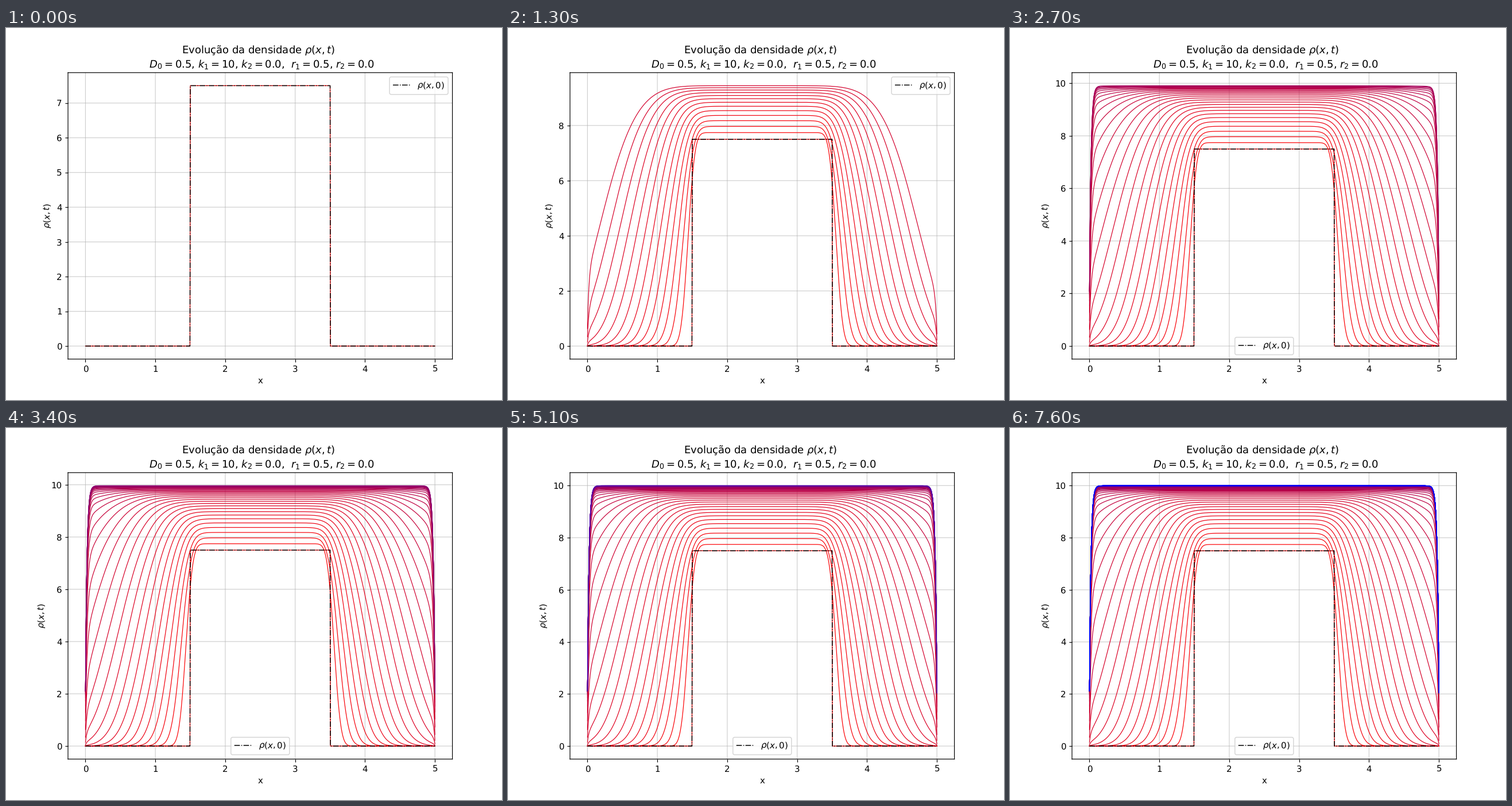
Recreate the animation shown at these times as a matplotlib script. Size 864 by 648 pixels, loop 7.7 s.

```python
import numpy as np
import matplotlib.pyplot as plt
from matplotlib.animation import FuncAnimation

FRAMES, INTERVAL = 77, 100
LENGTH, NODES = 5.0, 1001
CAPACITY, START = 10.0, 7.5
# growth, diffusion and outward drift, all per frame
GROWTH, DIFF, DRIFT = 2 / 15, 0.0028, 0.052
CENTRE = 2.55  # the drift points away from here
SUBSTEPS = 300

# smooth, unsnapped lines and glyphs
plt.rcParams.update({"path.snap": False, "text.hinting": "none"})

x = np.linspace(0, LENGTH, NODES)


def solve():
    """Density profiles, one per frame, with zero density past both ends."""
    dx, dt = x[1] - x[0], 1 / SUBSTEPS
    spread = DIFF * dt / dx**2
    carry = DRIFT * (x - CENTRE) * dt / (2 * dx)
    left, right, mid = spread + carry, spread - carry, 1 - 2 * spread

    pad = np.zeros(NODES + 2)
    u = pad[1:-1]
    u[(x > 1.5 - dx / 2) & (x < 3.5 + dx / 2)] = START
    profiles = [u.copy()]
    for _ in range(FRAMES - 1):
        for _ in range(SUBSTEPS):
            gain = mid + GROWTH * dt * (1 - u / CAPACITY)
            u[:] = left * pad[:-2] + gain * u + right * pad[2:]
        profiles.append(u.copy())
    return profiles


profiles = solve()

fig, ax = plt.subplots(figsize=(8, 6), dpi=108)
curves = []
for i, rho in enumerate(profiles):
    a = i / (FRAMES - 1)
    curves += ax.plot(x, rho, color=(1 - a, 0, a), lw=0.8)
ax.plot(x, profiles[0], "k-.", lw=1, zorder=2.2, label=r"$\rho(x,0)$")

ax.set_title("Evolução da densidade $\\rho(x,t)$  \n"
             " $D_0=0.5$, $k_1=10$, $k_2=0.0$,  $r_1=0.5$, $r_2=0.0$")
ax.set_xlabel("x")
ax.set_ylabel(r"$\rho(x,t)$")
ax.set_xlim(-0.05 * LENGTH, 1.05 * LENGTH)
ax.grid(alpha=0.6)
legend = ax.legend(loc="upper right")


def update(n):
    for i, curve in enumerate(curves):
        curve.set_visible(i <= n)
    top = profiles[n].max()
    ax.set_ylim(-0.05 * top, 1.05 * top)
    legend.set_loc("upper right" if n < 18 else "lower center")
    return curves


anim = FuncAnimation(fig, update, frames=FRAMES, interval=INTERVAL,
                     repeat=True, repeat_delay=0)
plt.show()
```
